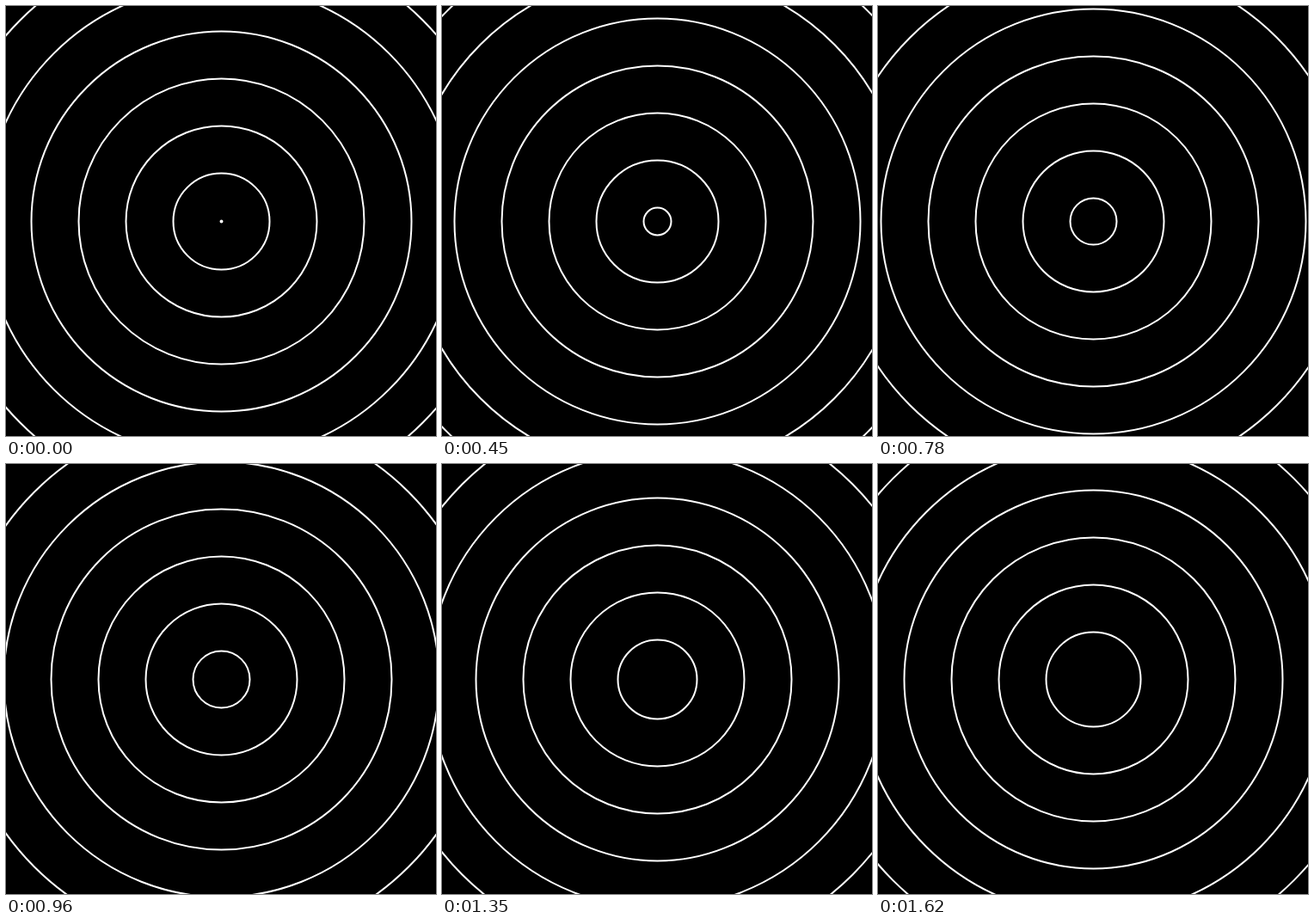
An HTML page for the animation above (1650 ms loop, 500 px wide and 500 px high).

```html
<!DOCTYPE html>
<html lang="en">
<head>
<meta charset="utf-8">
<title>Expanding rings</title>
<style>
  html, body { margin: 0; width: 100%; height: 100%; overflow: hidden; background: #000; }
  svg { display: block; width: 500px; height: 500px; }
  circle {
    fill: none;
    stroke: #fff;
    stroke-width: 2px;
    r: var(--r);
    /* the small lead keeps each step clear of rounding at its boundary */
    animation: grow 1650ms steps(55, end) -1ms infinite;
  }
  /* each ring grows 1px per step until it meets the next one */
  @keyframes grow {
    from { r: var(--r); }
    to { r: calc(var(--r) + 55px); }
  }
</style>
</head>
<body>
<svg viewBox="0 0 500 500">
  <circle cx="250.5" cy="250.5" style="--r: 1px"/>
  <circle cx="250.5" cy="250.5" style="--r: 56px"/>
  <circle cx="250.5" cy="250.5" style="--r: 111px"/>
  <circle cx="250.5" cy="250.5" style="--r: 166px"/>
  <circle cx="250.5" cy="250.5" style="--r: 221px"/>
  <circle cx="250.5" cy="250.5" style="--r: 276px"/>
  <circle cx="250.5" cy="250.5" style="--r: 331px"/>
</svg>
</body>
</html>
```
